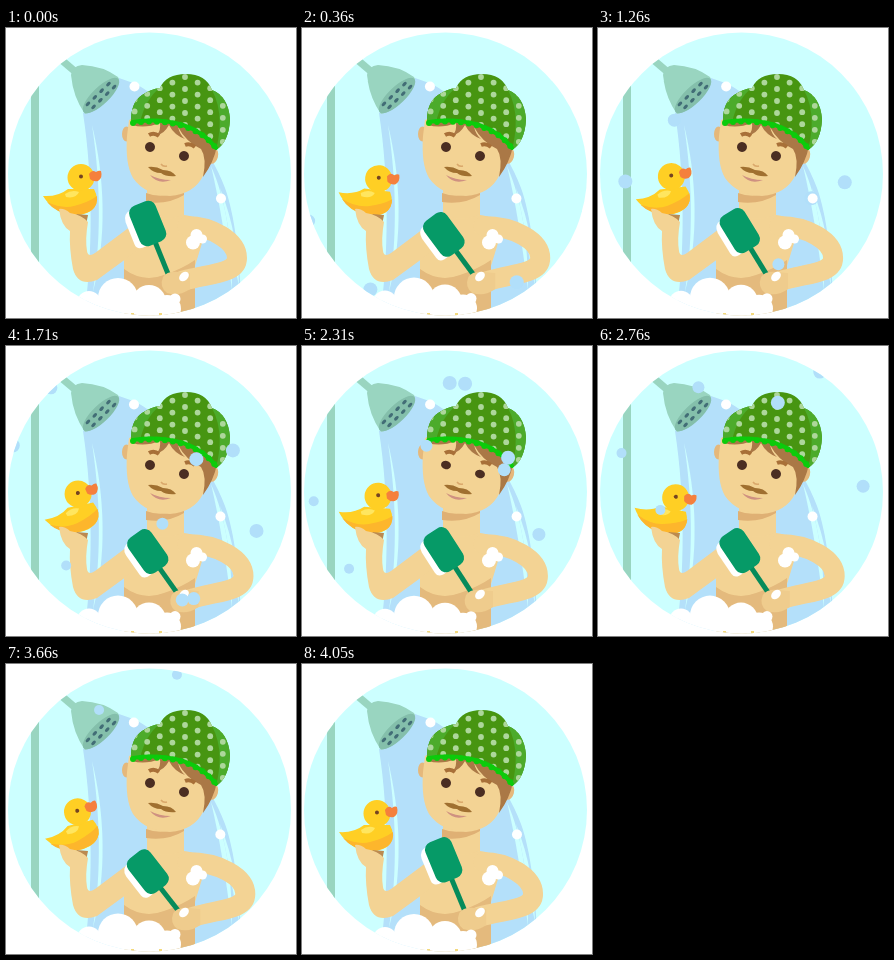
These frames come from a looping animation (290 px wide and 290 px high, 4.08 s). An HTML page:

```html
<!DOCTYPE html>
<html lang="en">
<head>
<meta charset="utf-8">
<title>Bath time</title>
<style>
html, body { margin: 0; width: 100%; height: 100%; overflow: hidden; background: #fff; }
svg { display: block; width: 290px; height: 290px; }
</style>
</head>
<body>
<svg viewBox="0 0 290 290" xmlns="http://www.w3.org/2000/svg">
  <defs>
    <clipPath id="stage"><circle cx="143.5" cy="146" r="141.5"/></clipPath>
    <clipPath id="capClip"><use href="#capShape"/></clipPath>
  </defs>
  <g clip-path="url(#stage)">
    <rect width="290" height="290" fill="#cff"/>
    <rect x="25" y="40" width="8" height="220" fill="#99d5c0"/>

    <!-- water -->
    <path d="M77 85 L113 50 L130 56 C168 78 204 118 219 160 C229 188 234 230 236 290 H78 C87 225 87 150 77 85Z" fill="#b4e0fa"/>
    <g fill="#cff">
      <path d="M86 97 C99 150 101 210 87 264 C96 205 94 150 86 97Z"/>
      <path d="M205 138 C220 172 226 212 226 262 C220 214 214 176 205 138Z"/>
      <path d="M214 160 C228 195 232 225 233 258 C226 225 222 193 214 160Z"/>
    </g>

    <!-- shower head -->
    <path d="M52 29 L72 46" stroke="#99d5c0" stroke-width="7.500"/>
    <path d="M65 47 Q66 38 76 37 Q97 38 112 49 Q116 56 104 69 Q91 84 79 86 Q67 69 65 47Z" fill="#99d5c0"/>
    <g transform="translate(95 67.5) rotate(-44)">
      <ellipse rx="24" ry="8.500" fill="#84bfab"/>
      <g id="holes" fill="#426d76"/>
    </g>

    <!-- torso -->
    <path d="M125 203 Q136 190 143 188 L178 187 Q192 188 200 202 L189 238 V290 H118 V230Z" fill="#f3d394"/>
    <path d="M118 241 Q137 255 158 247 Q176 241 189 232 V290 H118Z" fill="#e4ba7d"/>
    <path d="M141 155 H178 V187 Q160 194 141 187Z" fill="#f3d394"/>
    <path d="M140 165 Q158 172 178 161 V167 Q162 177 140 174Z" fill="#dfb074"/>

    <g id="duck">
      <path d="M37 168 Q52 169 62 161 H88 Q94 172 88 180 Q81 188 66 187 Q47 184 37 168Z" fill="#ffcf24"/>
      <path d="M41 174 Q56 181 68 178 Q83 174 91 168 Q92 177 86 182 Q79 187 66 187 Q50 185 41 174Z" fill="#fdb62c"/>
      <circle cx="75" cy="149.500" r="13.500" fill="#ffcf24"/>
      <path d="M83 146 Q86 141 90 144 Q93 142 95 143 Q97 150 92 153 Q87 154 84 151Z" fill="#f5803c"/>
      <circle cx="75" cy="148.500" r="2" fill="#754421"/>
      <path d="M59 166 Q66 161 73 164 Q70 171 60 169Z" fill="#ffe65f"/>
    </g>

    <!-- arm holding the duck -->
    <path d="M70 186 L82 187 L80 197 Z" fill="#bb8a50"/>
    <path d="M53 181 Q58 180 64 185 Q76 187 82 194 Q79 211 81 223 Q82 230 89 225 L129 195 L139 217 L91 252 Q72 259 67 241 Q63 220 64 203 Q55 198 53 181Z" fill="#f3d394"/>

    <!-- head -->
    <ellipse cx="120.500" cy="106" rx="4.500" ry="7.500" fill="#e5b87b"/>
    <ellipse cx="207" cy="128" rx="5" ry="8" fill="#e5b87b" transform="rotate(14 207 128)"/>
    <path d="M123 92 Q164 72 211 117 Q206 138 197 148 Q188 166 164 168 Q139 167 127 150 Q119 136 121 108Z" fill="#f3d394"/>
    <path d="M126 94 Q166 82 211 118 Q208 134 197 149 Q201 130 195 121 Q180 114 172 99 Q174 107 179 111 Q168 107 163 97 Q158 106 151 107 Q155 102 154 95 Q139 101 126 97Z" fill="#aa7846"/>
    <path d="M143 107 Q148 104 153 108 M179 117 Q184 115 189 119" fill="none" stroke="#a87038" stroke-width="4"/>
    <g id="eyes" fill="#4b2e22"></g>
    <path d="M155 136 Q157 139 161 138" fill="none" stroke="#daa86b" stroke-width="1.500"/>
    <path d="M142 139 Q150 138 157 142 Q166 142 170 148 Q160 149 155 145 Q147 145 142 139Z" fill="#a07030"/>
    <path d="M144 147 Q153 152 165 152 Q152 157 144 147Z" fill="#cf9181"/>

    <!-- cap -->
    <path id="capShape" d="M125 96 Q124 75 136 67 Q145 61 154 60 Q160 46 180 46 Q200 46 206 62 Q222 68 224 91 Q223 114 210 122 Q197 105 176 98 Q151 91 125 96Z" fill="#479511"/>
    <g clip-path="url(#capClip)">
      <path d="M206 62 Q219 86 210 122 L230 110 V60Z M154 60 Q140 70 134 94 H120 V60Z" fill="#4cab2b"/>
      <g id="dots" fill="#add79b"/>
    </g>
    <path d="M127 94 Q153 90 177 97 Q198 104 210 120" fill="none" stroke="#0ccb0b" stroke-width="4" stroke-linecap="round"/>
    <path d="M127 95 Q153 91 177 98 Q198 105 209 119" fill="none" stroke="#0ccb0b" stroke-width="6" stroke-linecap="round" stroke-dasharray="0 8"/>

    <!-- brush, then the arm that holds it -->
    <g id="brush">
      <path d="M-11 -18 Q-19 -18 -20 -9 L-20 15 Q-20 22 -10 21Z" fill="#fff"/>
      <rect x="-2.500" y="18" width="5" height="42" fill="#068b5b"/>
      <rect x="-14" y="-21" width="28" height="43" rx="8" fill="#069a67"/>
    </g>
    <path id="arm" fill="none" stroke="#f3d394" stroke-width="20" stroke-linecap="round"/>
    <path id="hand" d="M-13 -5 Q-9 -11 2 -10 L14 -9 L14 7 Q3 15 -9 11 Q-17 5 -13 -5Z" fill="#efcc8d"/>
    <ellipse cx="178" cy="248.500" rx="5.500" ry="4" transform="rotate(-42 178 248.500)" fill="#fff"/>
    <g fill="#fff">
      <circle cx="190.500" cy="207" r="6"/><circle cx="187" cy="214.500" r="7"/><circle cx="196.500" cy="211" r="4.500"/>
    </g>

    <g id="bubbles" fill="#b1dffa"/>
    <g id="drops" fill="#fff"><circle cx="128.500" cy="58.500" r="5"/><circle cx="215" cy="170.500" r="5"/></g>
    <g id="foam" fill="#fff">
      <circle cx="83" cy="275" r="12"/><circle cx="112" cy="270" r="20"/><circle cx="143" cy="274" r="17"/>
      <circle cx="161" cy="281" r="14"/><circle cx="169" cy="271" r="5.500"/><rect x="65" y="271" width="105" height="20"/>
    </g>
    <path d="M125 285h3v3h-3zM153 285h3v3h-3z" fill="#f3d97d"/>
  </g>
</svg>
<script>
const LOOP = 4080, SCRUB = 1020, ROCK = 2040;
const $ = id => document.getElementById(id);
const ease = k => (1 - Math.cos(Math.PI * k)) / 2;
const clamp = k => Math.max(0, Math.min(1, k));
const mix = (a, b, k) => a + (b - a) * k;

function add(parent, tag, attrs) {
  const node = document.createElementNS('http://www.w3.org/2000/svg', tag);
  for (const key in attrs) node.setAttribute(key, attrs[key]);
  return parent.appendChild(node);
}

for (const side of [-1, 1])
  for (let i = -1.5; i <= 1.5; i++)
    add($('holes'), 'ellipse', { cx: i * 9.5 + side, cy: side * 3, rx: 2.8, ry: 1.6 });

// Dots lie on rows that fall away to both sides of the crown.
for (let row = 0; row < 7; row++)
  for (let i = -4; i <= 4; i++)
    add($('dots'), 'circle', { cx: 179 + i * 12.6, cy: 49 + row * 12 + Math.abs(i) * 5.6, r: 2.9 });

const eyes = [[144, 119], [178, 128]].map(([x, y]) =>
  ({ x, y, node: add($('eyes'), 'circle', { r: 5 }) }));

// A bubble rises steadily (px/s), passing x at mid-height at time `mid`,
// while it leans and bends sideways with its height.
const bubbles = [];
function bubble(r, mid, rise, x, lean, bend) {
  bubbles.push({ mid, rise, x, lean, bend, node: add($('bubbles'), 'circle', { r }) });
}
bubble(6.5, 745, 112, 58, 82, -87);
bubble(7, 1290, 120, 26, -38, 0);
bubble(7, 1300, 111, 246, -20, -48);
bubble(7, 1421, 127, 206, -38, -12);
bubble(6, 1925, 130, 145, -41, 0);
bubble(7, 1997, 122, 228, -61, 10);
bubble(6.5, 2190, 217, 197, 20, 0);
bubble(5, 2360, 107, 11, -9, 89);
bubble(6.5, 2670, 107, 260, 54, -16);
bubble(5, 2867, 131, 66, 26, 0);

function rockAngle(p) {
  if (p < .32) return 12.5 * ease(p / .32);
  if (p < .78) return mix(12.5, -14, ease((p - .32) / .46));
  return -14 * (1 - ease((p - .78) / .22));
}

function draw(t) {
  const scrub = ease(2 * (t % SCRUB) / SCRUB), reach = scrub ** .75;
  const elbow = 231 + 9 * scrub, handX = 170 + 11 * reach;
  const move = (id, transform) => $(id).setAttribute('transform', transform);

  move('duck', `rotate(${rockAngle(t % ROCK / ROCK)} 66 163)`);
  move('brush', `translate(141.5 ${195 + 13 * reach}) rotate(${-22 - 17 * reach})`);
  move('hand', `translate(${handX} 254)`);
  move('drops', `translate(${-.7 * scrub} 0)`);
  move('foam', `translate(0 ${-.6 * scrub})`);
  $('arm').setAttribute('d', `M181 198 C${elbow - 26} 198 ${elbow} 213 ${elbow} 230
    C${elbow} 246 ${elbow - 26} 245 ${handX + 6} 253`);

  const blink = 1 - .9 * ease(clamp(1 - Math.abs(t - 2420) / 150));
  for (const { x, y, node } of eyes)
    node.setAttribute('transform', `translate(${x} ${y}) rotate(14) scale(1 ${blink})`);

  for (const { mid, rise, x, lean, bend, node } of bubbles) {
    const h = (t - mid) * rise / 1e5;
    node.setAttribute('cx', x + lean * h + bend * h * h);
    node.setAttribute('cy', 150 - 100 * h);
  }
}

const began = performance.now();
function tick() {
  draw((performance.now() - began) % LOOP);
  requestAnimationFrame(tick);
}
tick();
</script>
</body>
</html>
```
